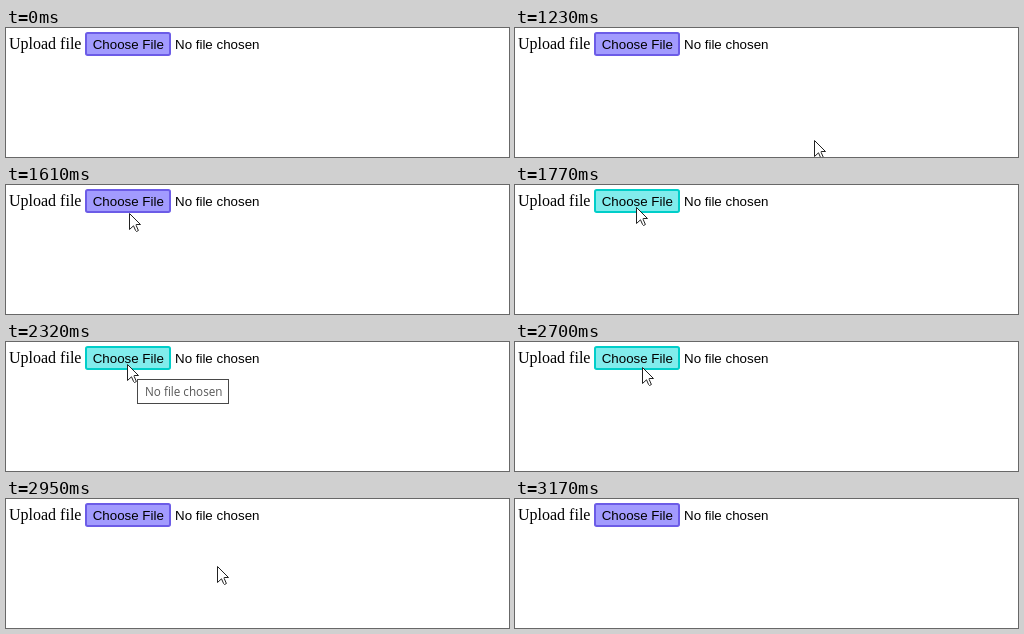
Recreate the animation shown at these times as an HTML page. Size 503 by 129 pixels, loop 4030 ms.

```html
<!DOCTYPE html>
<html lang="en">
<head>
<meta charset="utf-8">
<style>
  html, body { margin: 0; width: 100%; height: 100%; overflow: hidden; background: #fff; }
  svg { display: block; }
  .label { font: 16px "Liberation Serif", "Times New Roman", serif; }
  .control { font: 13.333px "Liberation Sans", Arial, sans-serif; }
  .tip { font: 11.7px "Open Sans", sans-serif; fill: #575757; }
  #button { fill: #a29bfe; stroke: #6c5ce7; stroke-width: 2; }
  #button.hover { fill: #81ecec; stroke: #00cec9; }
</style>
</head>
<body>
<svg width="503" height="129" viewBox="0 0 503 129">
  <text class="label" x="3" y="21">Upload file</text>
  <rect id="button" x="80" y="5" width="84" height="22" rx="1.7"/>
  <text class="control" x="86.7" y="21">Choose File</text>
  <text class="control" x="169" y="21">No file chosen</text>
  <g id="tooltip">
    <rect x="131.5" y="37.5" width="91" height="24" fill="#fff" stroke="#484848"/>
    <text class="tip" x="139" y="54">No file chosen</text>
  </g>
  <path id="cursor" d="M.5 .5V16.5L4.5 12.8L6.6 17.6L7.5 18.5L9.4 17.5L7.2 12.5V11.5H11.5Z" fill="#fff" stroke="#222"/>
</svg>
<script>
  const LOOP = 4030, STEP = 77;
  const ENTER = 1230, TIP = 2320, LEAVE = 2700, GONE = 3170;
  const from = { x: 299, y: 112 }, rest = { x: 121, y: 22 }, to = { x: 319, y: 122 };
  const [button, tooltip, cursor] = ["button", "tooltip", "cursor"].map(id => document.getElementById(id));

  const show = (node, on) => node.setAttribute("visibility", on ? "visible" : "hidden");
  const mix = (a, b, u) => Math.round(a + (b - a) * u);
  // The pointer is sampled in steps; returns progress from 0 to 1
  const progress = (t, start, steps) => Math.min(1, Math.floor((t - start + 5) / STEP) / steps);
  const easeOut = (u, power) => 1 - (1 - u) ** power;

  function pointer(t) {
    if (t < LEAVE) {
      const u = progress(t, ENTER, 7);
      return [mix(from.x, rest.x, easeOut(u, 3.8)), mix(from.y, rest.y, easeOut(u, 2.2))];
    }
    const u = progress(t, LEAVE - STEP, 6) ** 1.95;
    return [mix(rest.x, to.x, u), mix(rest.y, to.y, u)];
  }

  function draw(t) {
    const [x, y] = pointer(t);
    const present = t >= ENTER && t < GONE;
    show(cursor, present);
    show(tooltip, t >= TIP && t < LEAVE);
    cursor.setAttribute("transform", `translate(${x} ${y})`);
    button.classList.toggle("hover", present && x >= 79 && x < 165 && y >= 4 && y < 28);
  }

  const origin = performance.now();
  function tick() {
    draw((performance.now() - origin) % LOOP);
    requestAnimationFrame(tick);
  }
  tick();
</script>
</body>
</html>
```
